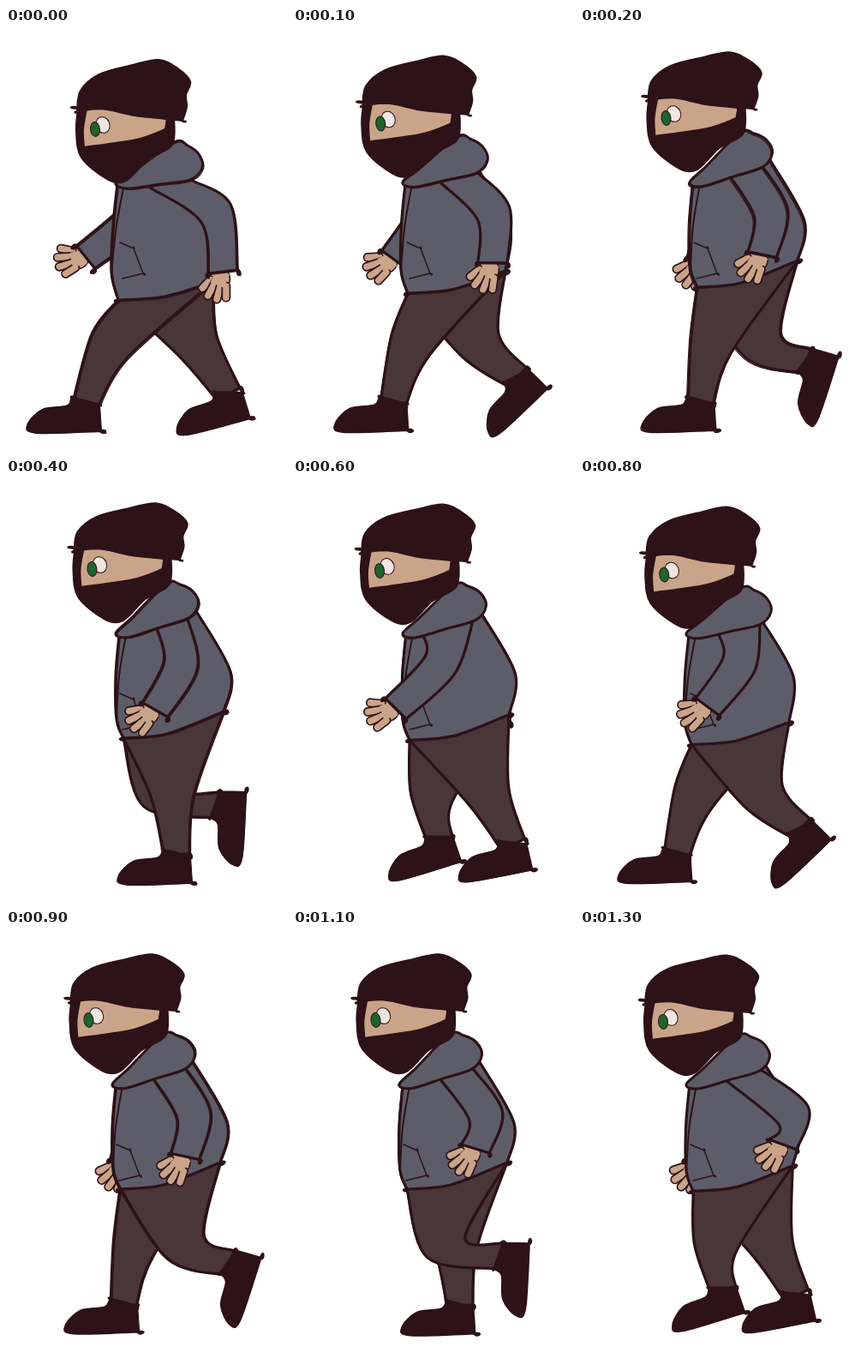
An HTML page with a canvas for the animation above (1.4 s loop, 328x493 px).

```html
<!DOCTYPE html>
<html lang="en">
<head>
<meta charset="utf-8">
<title>Walk cycle</title>
<style>
html, body { margin: 0; width: 100%; height: 100%; overflow: hidden; background: #fff; }
canvas { display: block; width: 100vw; height: 100vh; }
</style>
</head>
<body>
<canvas id="stage" width="328" height="493"></canvas>
<script>
const ctx = document.getElementById('stage').getContext('2d');
const INK = '#2d1218', CLOTH = '#5d5d69', PANTS = '#483639', SKIN = '#caa488';
const STEP = 100, STEPS = 14, HALF = 7;
let step = 0;

const mix = (a, b, k) => a.map((v, i) => v + (b[i] - v) * k);
const pairs = s => s.split(', ').map(p => p.split(' ').map(Number));

// Linear motion through rows of [step, ...values].
function track(rows, t) {
  let i = 0;
  while (i < rows.length - 2 && t >= rows[i + 1][0]) i++;
  const [a, b] = [rows[i], rows[i + 1]];
  return mix(a, b, (t - a[0]) / (b[0] - a[0])).slice(1);
}

// Smooth curve through points; a doubled point makes a corner.
function curve(points, closed, corners) {
  const pts = points.flatMap((p, i) => corners.includes(i) ? [p, p] : [p]);
  const n = pts.length;
  const at = i => pts[closed ? (i + n) % n : Math.max(0, Math.min(n - 1, i))];
  const path = new Path2D();
  path.moveTo(...pts[0]);
  for (let i = 0; i < n - !closed; i++) {
    const [a, b, c, d] = [-1, 0, 1, 2].map(j => at(i + j));
    path.bezierCurveTo(
      b[0] + (c[0] - a[0]) / 6, b[1] + (c[1] - a[1]) / 6,
      c[0] - (d[0] - b[0]) / 6, c[1] - (d[1] - b[1]) / 6, ...c);
  }
  return path;
}

function stroke(path, width, color = INK) {
  ctx.lineWidth = width;
  ctx.strokeStyle = color;
  ctx.stroke(path);
}

function shape(points, fill, width, { closed = false, corners = [] } = {}) {
  const path = curve(points, closed, corners);
  if (fill) {
    ctx.fillStyle = fill;
    ctx.fill(path);
  }
  stroke(path, width);
  if (width < 3) return;
  // loose second line
  ctx.save();
  ctx.translate(1.8 * Math.sin(step * 5 + 1), 1.4 * Math.cos(step * 3));
  stroke(path, 1.1);
  ctx.restore();
}

function oval(x, y, rx, ry, turn, fill, width) {
  const path = new Path2D();
  path.ellipse(x, y, rx, ry, turn, 0, 7);
  stroke(path, width * 2);
  ctx.fillStyle = fill;
  ctx.fill(path);
}

function placed([x, y], turn, paint) {
  ctx.save();
  ctx.translate(x, y);
  ctx.rotate(turn);
  paint();
  ctx.restore();
}

// Point beside p, at right angles to the line from a to b.
function beside(p, a, b, gap) {
  const [dx, dy] = [b[0] - a[0], b[1] - a[1]], len = Math.hypot(dx, dy);
  return [p[0] + dy / len * gap, p[1] - dx / len * gap];
}

// Tapered tube: two root points, a middle joint and an end joint.
function limb(back, front, mid, end, midHalf, endHalf, fill) {
  const root = mix(back, front, .5);
  shape([back, beside(mid, root, end, midHalf), beside(end, mid, end, endHalf),
    beside(end, mid, end, -endHalf), beside(mid, root, end, -midHalf), front],
    fill, 3.2, { corners: [2, 3] });
}

// step, knee x, ankle x, ankle y, shoe angle
const LEG = [
  [0, 121, 93, 437, 0], [2, 153, 141, 436, 0], [4, 194, 199, 438, 0], [6, 229, 257, 426, -9],
  [7, 224, 260, 427, -13], [9, 214, 265, 388, -70], [11, 183, 246, 380, -85],
  [13, 162, 171, 419, -15], [14, 121, 93, 437, 0]];
// step, elbow x, wrist x, wrist y
const NEAR_ARM = [
  [0, 245, 253, 284], [2, 223, 213, 264], [4, 204, 174, 269], [7, 156, 93, 267],
  [9, 223, 213, 264], [11, 229, 217, 255], [13, 253, 241, 250], [14, 245, 253, 284]];
const FAR_ARM = [
  [0, 156, 93, 267], [2, 157, 142, 272], [7, 250, 260, 288],
  [9, 157, 142, 272], [11, 190, 190, 262], [13, 165, 143, 274], [14, 156, 93, 267]];
// step, how far the body has risen
const LIFT = [[0, 0], [2, 1], [4, 1], [6, .85], [7, 0]];

const TORSO_LOW = pairs('130 182, 125 230, 123 285, 131 317, 185 313, 242 296, 244 235, 212 178');
const TORSO_HIGH = pairs('132 182, 128 230, 129 280, 137 302, 188 297, 254 271, 262 225, 222 154');
const HOOD = pairs('0 0, 14 7, 52 2, 87 -3, 101 -17, 97 -33, 84 -43, 68 -47, 22 -15');
const POCKET = pairs('133 250, 149 257, 160 286, 136 292');
const SHOE = pairs('-15 -6, 15 2, 17 32, -58 34, -67 25, -50 8, -22 4');
const SKULL = pairs('84 94, 82 120, 88 151, 118 176, 140 178, 166 153, 194 136, 196 102');
const FACE = pairs('94 94, 90 118, 91 139, 152 130, 186 118, 188 106, 150 102, 118 95');
const HAT = pairs('83 97, 87 73, 109 54, 148 43, 178 37, 199 46, 215 62, 210 78, 211 92, 206 108, 150 101, 115 94');

function leg(t, back, front) {
  const [kneeX, x, y, turn] = track(LEG, t);
  limb(back, front, [kneeX, 370], [x, y], 25, 15, PANTS);
  placed([x, y], turn * Math.PI / 180, () =>
    shape(SHOE, INK, 3, { closed: true, corners: [0, 1, 2] }));
}

function hand(size) {
  oval(size * .3, 0, size * .38, size * .33, 0, SKIN, 1.5);
  for (let i = 3; i >= 0; i--) {
    const a = (i - 1.5) * .34, reach = size * (1 - .07 * Math.abs(i - 1.5));
    const finger = new Path2D();
    finger.moveTo(size * .42, size * .6 * Math.sin(a));
    finger.lineTo(reach * Math.cos(a), reach * Math.sin(a));
    stroke(finger, size * .22 + 3.4);
    stroke(finger, size * .22, SKIN);
  }
  ctx.fillStyle = SKIN;
  ctx.fillRect(0, -size * .25, size * .5, size * .5);
}

function arm(rows, t, lift) {
  const [elbowX, x, y] = track(rows, t);
  const elbow = [elbowX, 216], wrist = [x, y];
  const back = [Math.min(218 - 8 * lift, elbowX + 40), 178 - 21 * lift];
  const front = [Math.min(168 + 8 * lift, elbowX - 24), 186 - 12 * lift];
  // the hand bends a little further than the forearm
  placed(wrist, Math.atan2(y - elbow[1], x - elbowX) + .5, () => hand(34));
  limb(back, front, elbow, wrist, 20, 17, CLOTH);
}

function head(lift) {
  placed([-3.5 * lift, -13 * lift], 0, () => {
    shape(SKULL, INK, 2, { closed: true, corners: [0, 7] });
    shape(FACE, SKIN, 2, { closed: true, corners: [0, 2, 4, 5] });
    oval(113, 113, 7.5, 9, -.35, '#efe6e2', 1);
    oval(104, 118, 5, 8, -.1, '#1d642c', 1);
    shape([[187, 104], [188, 120]], null, 1.2);
    const tall = 1 - .07 * lift;
    ctx.translate(0, 97 * (1 - tall));
    ctx.scale(1, tall);
    shape(HAT, INK, 2, { closed: true, corners: [0, 9] });
  });
}

function draw() {
  const t = step;
  const [lift] = track(LIFT, t % HALF);
  const torso = TORSO_LOW.map((p, i) => mix(p, TORSO_HIGH[i], lift));
  const hemFront = torso[3], hemBack = torso[5];
  ctx.fillStyle = '#fff';
  ctx.fillRect(0, 0, 328, 493);
  placed([t < HALF ? 0 : -4, 0], 0, () => {
    arm(FAR_ARM, t, lift);
    leg((t + HALF) % STEPS, hemBack, hemFront);
    leg(t, hemBack, hemFront);
    shape(torso, CLOTH, 3.2, { corners: [3, 5] });
    // drawstring, hanging just inside the front edge
    shape(torso.slice(0, 3).map(([x, y], i) => [x + 8 - 4 * i, y]), null, 2);
    shape(POCKET, null, 1.5, { corners: [1, 2] });
    arm(NEAR_ARM, t, lift);
    placed([128, 180], -.175 * lift, () => shape(HOOD, CLOTH, 3, { closed: true }));
    head(lift);
  });
}

ctx.lineCap = ctx.lineJoin = 'round';
const start = performance.now();
function tick(now) {
  step = Math.floor(Math.max(0, now - start) / STEP) % STEPS;
  draw();
  requestAnimationFrame(tick);
}
draw();
requestAnimationFrame(tick);
</script>
</body>
</html>
```
